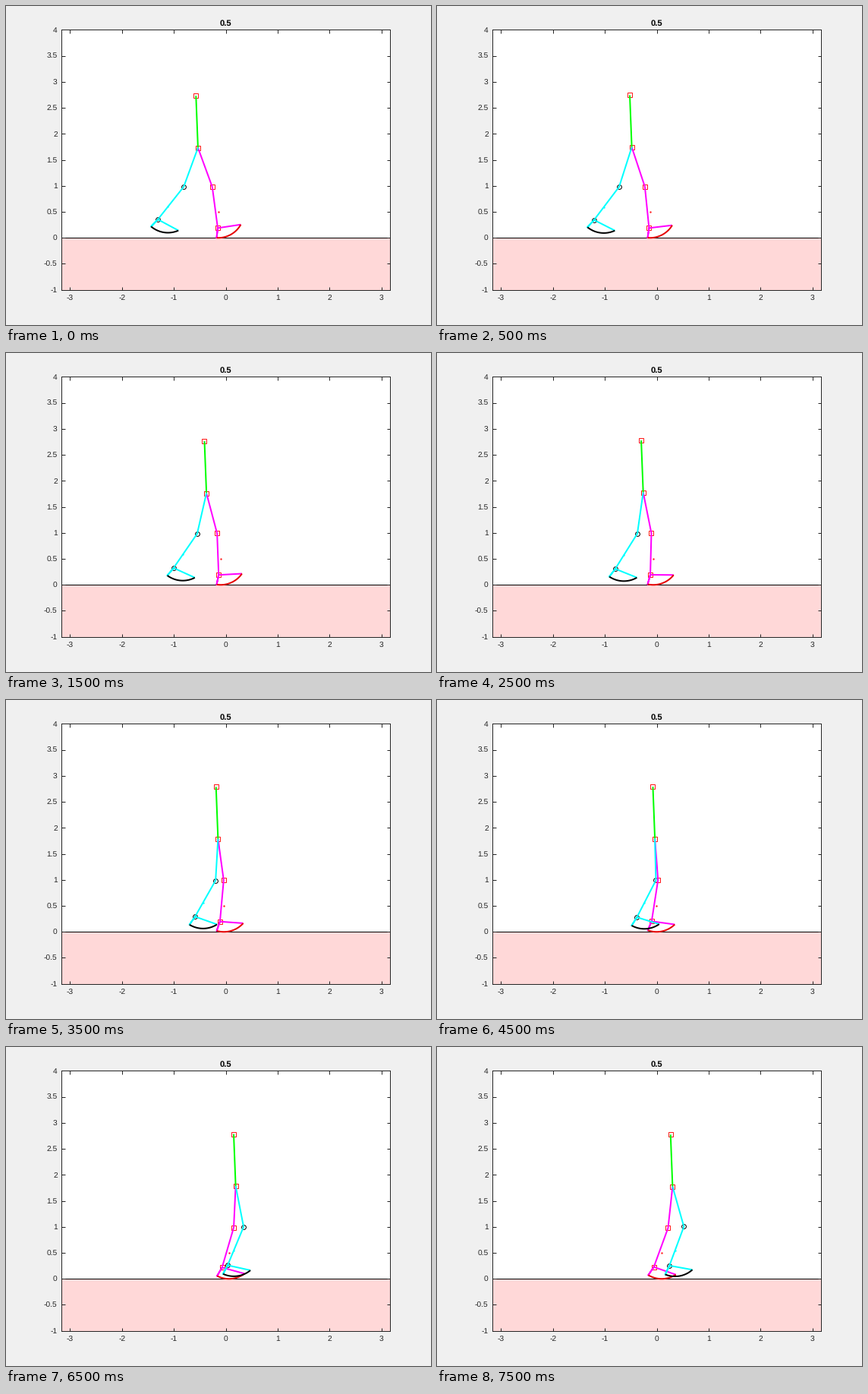
A matplotlib script that plays this animation: 560 by 420 pixels, repeating every 8 s.

```python
import numpy as np
import matplotlib.pyplot as plt
from matplotlib.animation import FuncAnimation
from matplotlib.patches import Rectangle

W, H, DPI = 560, 420, 100
FRAMES, INTERVAL = 16, 500
PX = 72 / DPI                 # points per pixel

LEG, TORSO = 0.8, 1.0         # segment lengths
R, ANKLE_R = 0.5, 0.312       # sole radius, ankle distance from sole centre
HEEL, TOE = 1.9, -62.2        # sole ends relative to the ankle, degrees

plt.rcParams["font.family"] = "Liberation Sans"
plt.rcParams["text.hinting"] = "none"
fig = plt.figure(figsize=(W / DPI, H / DPI), dpi=DPI, facecolor="#f0f0f0")

left, bottom, width, height = 72.7, 46.3, 433.7, 342.3
ax = fig.add_axes([left / W, bottom / H, width / W, height / H])
half = width / height * 5 / 2
ax.set_xlim(-half, half)
ax.set_ylim(-1, 4)

xt = np.arange(-3, 4)
yt = np.arange(-1, 4.5, 0.5)
ax.set_xticks(xt, [f"{v:g}" for v in xt])
ax.set_yticks(yt, [f"{v:g}" for v in yt])
ax.tick_params(direction="in", top=True, right=True, length=4.5 * PX,
               width=PX, color="#262626", labelcolor="#262626",
               labelsize=10.3 * PX, pad=5 * PX)
ax.tick_params(axis="x", pad=6.5 * PX)
for spine in ax.spines.values():
    spine.set(linewidth=PX, color="#262626")
fig.text((left + width / 2) / W, 1 - 26 / H, "0.5", ha="center",
         va="baseline", size=11.3 * PX, weight="bold", color="black")

ax.add_patch(Rectangle((-half, -1), 2 * half, 1, facecolor="#ffd8d8",
                       edgecolor="none", zorder=0.5))
ax.plot([-half, half], [0, 0], color="black", lw=PX, zorder=1)


def stroke(color, z):
    return ax.plot([], [], color=color, lw=2 * PX, zorder=z,
                   solid_capstyle="butt", solid_joinstyle="round")[0]


def marks(shape, color, z):
    return ax.plot([], [], ls="none", marker=shape, ms=5.8 * PX, mfc="none",
                   mec=color, mew=PX, zorder=z)[0]


def dot(color, z):
    return ax.plot([], [], ls="none", marker="o", ms=2.4 * PX, mfc=color,
                   mec="none", zorder=z)[0]


stance_leg, stance_sole = stroke("#ff00ff", 2), stroke("#e60000", 2.1)
swing_leg, swing_sole = stroke("#00ffff", 2.3), stroke("black", 2.4)
torso = stroke("#00ff00", 2.2)
stance_dot, swing_dot = dot("#ff2020", 2.5), dot("#00ffff", 2.5)
circles, squares = marks("o", "black", 1.5), marks("s", "#ff1a1a", 1.6)


def up(deg, length):
    """Offset along a segment leaning right by deg from vertical."""
    a = np.radians(deg)
    return length * np.array([np.sin(a), np.cos(a)])


def sole_point(center, deg, r=R):
    """Point of the foot, deg measured clockwise from the right."""
    a = np.radians(deg)
    return center + r * np.array([np.cos(a), -np.sin(a)])


def put(line, points):
    line.set_data(*np.transpose(points))


def draw_leg(leg, sole, mid, hip, knee, ankle, center, deg):
    arc = [sole_point(center, deg + d) for d in np.linspace(HEEL, TOE, 30)]
    put(leg, [hip, knee, ankle, arc[0], ankle, arc[-1]])
    put(sole, arc)
    put(mid, [center])


def update(k):
    # Stance foot rolls without slipping, shank locked to it
    roll = 1.8 * k + 0.003 * k * k
    shank = roll - 7.6
    center = np.array([-0.146 + R * np.radians(roll), R])
    foot = 99.1 + shank
    ankle = sole_point(center, foot, ANKLE_R)
    knee = ankle + up(shank, LEG)
    hip = knee + up(-20.1 + 1.753 * k, LEG)
    head = hip + up(-2.2, TORSO)
    draw_leg(stance_leg, stance_sole, stance_dot,
             hip, knee, ankle, center, foot)
    put(torso, [head, hip])
    put(squares, [head, hip, knee, ankle])

    # Swing leg hangs from the hip
    thigh = -20.1 + 2.393 * k
    shank = -38.4 + 1.3 * k - 0.0065 * k * k
    knee = hip - up(-thigh, LEG)
    ankle = knee - up(-shank, LEG)
    center = ankle + up(-shank, ANKLE_R)
    draw_leg(swing_leg, swing_sole, swing_dot,
             hip, knee, ankle, center, 90 - shank)
    put(circles, [knee, ankle])
    return (stance_leg, stance_sole, swing_leg, swing_sole, torso,
            stance_dot, swing_dot, squares, circles)


anim = FuncAnimation(fig, update, frames=FRAMES, interval=INTERVAL,
                     repeat=True, repeat_delay=0)
plt.show()
```
